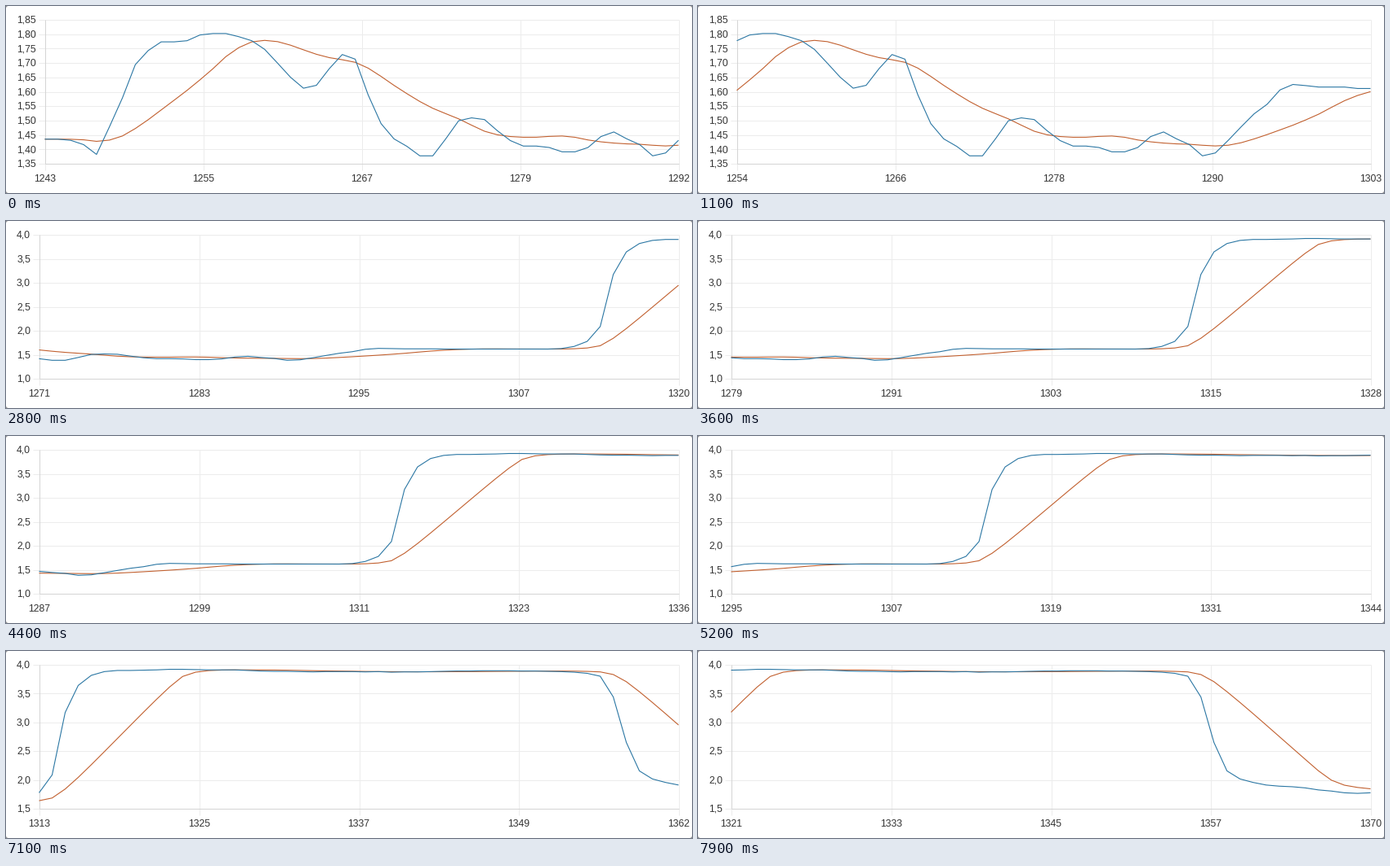
A matplotlib script that plays this animation: 840x230 px, repeating every 8 s.

```python
import math

import matplotlib.pyplot as plt
import numpy as np
from matplotlib.animation import FuncAnimation
from matplotlib.collections import LineCollection
from matplotlib.patches import FancyBboxPatch

W, H, DPI = 840, 230, 80
PX = 72 / DPI
FRAMES, INTERVAL = 80, 100

TOP, BOTTOM, RIGHT = 16.5, 193.5, 823.5
TICK = 8
BLUE, ORANGE = "#2a76a3", "#c15f2e"
GRID, AXIS, INK = "#ececec", "#d4d4d4", "#333333"

FIRST = 1243          # sample number of the first value
SPAN = 49             # samples between the left and right edge
WINDOW = 10           # length of the trailing mean

signal = np.array([
    1.434, 1.434, 1.430, 1.415, 1.381, 1.477, 1.577, 1.693, 1.742, 1.772,
    1.772, 1.776, 1.796, 1.801, 1.801, 1.790, 1.776, 1.746, 1.698, 1.649,
    1.611, 1.621, 1.679, 1.728, 1.712, 1.588, 1.488, 1.435, 1.409, 1.376,
    1.376, 1.435, 1.498, 1.508, 1.502, 1.463, 1.429, 1.410, 1.410, 1.405,
    1.390, 1.390, 1.405, 1.443, 1.459, 1.435, 1.415, 1.376, 1.386, 1.430,
    1.477, 1.522, 1.555, 1.605, 1.624, 1.620, 1.615, 1.615, 1.615, 1.610]
    + [1.61] * 8 + [
    1.62, 1.665, 1.77, 2.08, 3.165, 3.635, 3.81, 3.875, 3.895, 3.895,
    3.90, 3.905, 3.915, 3.915, 3.91, 3.905, 3.905, 3.905, 3.895, 3.885,
    3.88, 3.88, 3.875, 3.87, 3.875, 3.875, 3.875, 3.87, 3.875, 3.865,
    3.87, 3.87, 3.875, 3.88, 3.885, 3.885, 3.89, 3.89, 3.89, 3.885,
    3.885, 3.88, 3.875, 3.865, 3.845, 3.795, 3.435, 2.645, 2.15, 2.01,
    1.95, 1.905, 1.885, 1.875, 1.855, 1.82, 1.80, 1.77, 1.76, 1.77])

padded = np.concatenate([np.full(WINDOW - 1, signal[0]), signal])
average = np.convolve(padded, np.ones(WINDOW) / WINDOW, mode="valid")


def window_start(k):
    """Offset of the left edge: one sample per tick, with two late ticks."""
    if k == 74:
        return 72
    return k if k < 53 else k - 1


def nice_step(span, parts=10):
    raw = span / parts
    unit = 10 ** math.floor(math.log10(raw))
    return unit * next(m for m in (1, 2, 5, 10) if raw / unit <= m)


def crisp(v):
    return math.floor(v) + 0.5


fig = plt.figure(figsize=(W / DPI, H / DPI), dpi=DPI, facecolor="#8f8f8f")
ax = fig.add_axes([0, 0, 1, 1])


def label(x, y, text, align):
    ax.text(x, y, text, ha=align, va="baseline", color=INK,
            family="Liberation Sans", size=12.3 * PX)


def rules(segments, color, z):
    ax.add_collection(LineCollection(segments, colors=color, linewidths=PX,
                                     zorder=z), autolim=False)


def draw(k):
    ax.clear()
    ax.axis("off")
    ax.set(xlim=(0, W), ylim=(H, 0))
    ax.add_patch(FancyBboxPatch((0, 0), W, H, fc="white", ec="none", zorder=0,
                                boxstyle="round,pad=0,rounding_size=3"))

    start = window_start(k)
    view = slice(start, start + SPAN + 1)
    blue, orange = signal[view], average[view]

    low = min(blue.min(), orange.min())
    high = max(blue.max(), orange.max())
    step = nice_step(high - low)
    n0, n1 = math.floor(low / step + 1e-9), math.ceil(high / step - 1e-9)
    digits = 2 if step < 0.09 else 1
    left = 47.5 if digits == 2 else 40.5

    def y_of(v):
        return BOTTOM - (v / step - n0) / (n1 - n0) * (BOTTOM - TOP)

    grid = []
    for n in range(n0, n1 + 1):
        y = y_of(n * step)
        grid.append([(left - TICK, crisp(y)), (RIGHT, crisp(y))])
        text = f"{n * step:.{digits}f}".replace(".", ",")
        label(left - 10.5, y + 4.2, text, "right")
    for i in range(5):
        x = left + (RIGHT - left) * i / 4
        grid.append([(crisp(x), TOP), (crisp(x), BOTTOM + TICK)])
        label(x, 215.5, str(FIRST + start + int(SPAN * i / 4)), "center")
    rules(grid, GRID, 1)
    rules([[(left, TOP), (left, BOTTOM)], [(left, BOTTOM), (RIGHT, BOTTOM)]],
          AXIS, 2)

    xs = np.linspace(left, RIGHT, SPAN + 1)
    for values, color in ((orange, ORANGE), (blue, BLUE)):
        ax.plot(xs, y_of(values), color=color, lw=1.1 * PX, zorder=3,
                solid_joinstyle="round", solid_capstyle="butt")
    return []


anim = FuncAnimation(fig, draw, frames=FRAMES, interval=INTERVAL,
                     init_func=lambda: draw(0), repeat=True, repeat_delay=0,
                     cache_frame_data=False)
plt.show()
```
